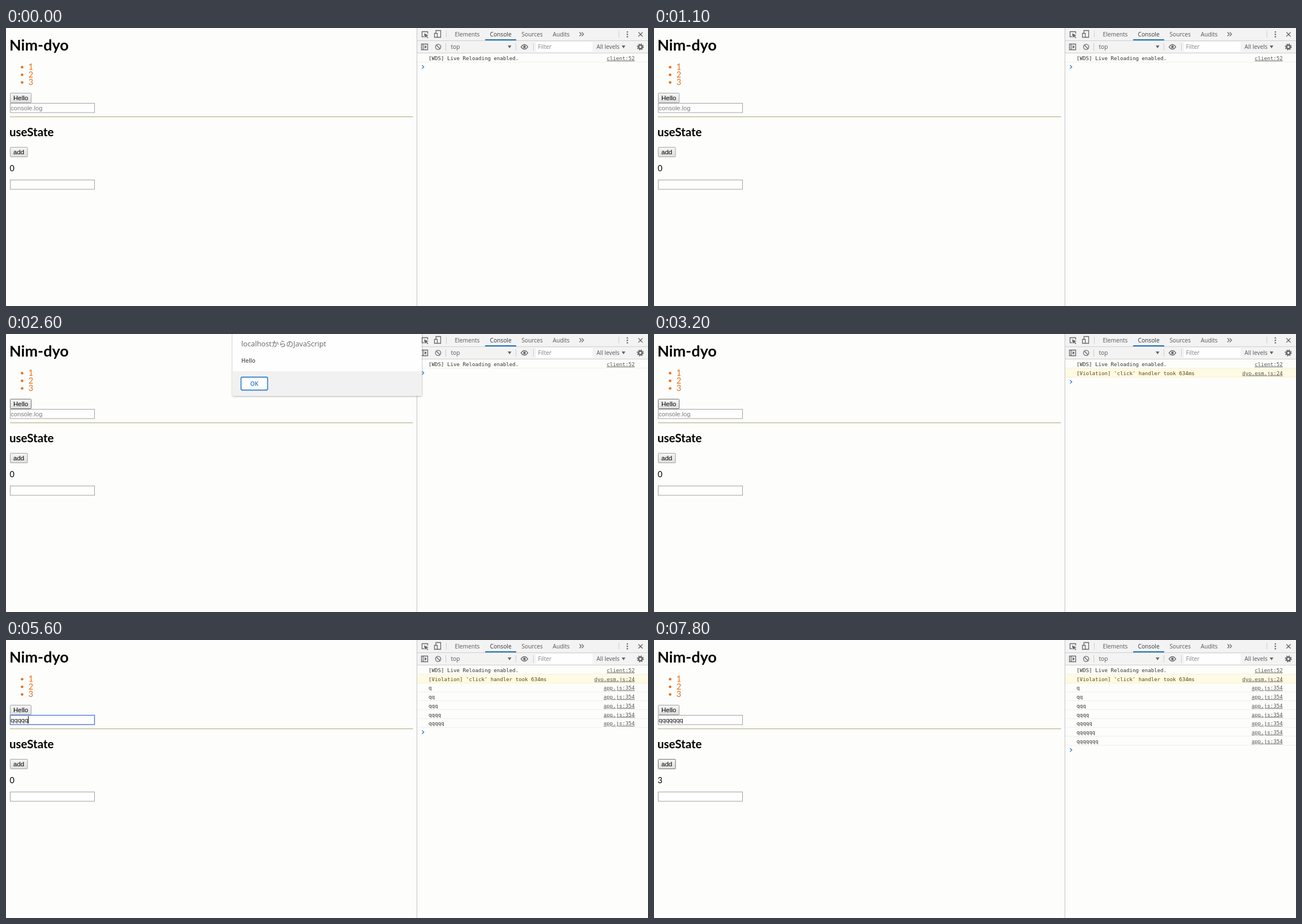
An HTML page for the animation above (8000 ms loop, 1135 by 493 pixels).

```html
<!DOCTYPE html>
<html lang="en">
<head>
<meta charset="utf-8">
<title>Nim-dyo</title>
<style>
  html, body { margin: 0; width: 100%; height: 100%; overflow: hidden; background: #fdfdfb; }
  svg { display: block; width: 1135px; height: 493px; }
  text { white-space: pre; }
  .page { font-family: Lato, sans-serif; }
  .form { font-family: "Liberation Sans", Arial, sans-serif; font-size: 11.1px; }
  .ui { font-family: "Open Sans", "Noto Sans CJK JP", sans-serif; font-size: 10.2px; fill: #555; }
  .log { font-family: "DejaVu Sans Mono", monospace; font-size: 9.13px; fill: #333; }
  .link { text-anchor: end; text-decoration: underline; fill: #555; }
  .warn { fill: #5c4510; }
  .field { fill: #fefefe; stroke: #a0a0a0; }
  .field.focus { stroke: #4d79d6; stroke-width: 1.4; }
  .button rect { fill: url(#face); stroke: #a3a3a3; }
  .button.hover rect { stroke: #707070; }
  .button.down rect { fill: #dcdcdc; }
  .button text { font-size: 11.5px; }
  .icon { fill: none; stroke: #666; stroke-width: 1.3; }
  .solid { fill: #666; }
</style>
</head>
<body>
<svg viewBox="0 0 1135 493">
  <defs>
    <linearGradient id="face" x2="0" y2="1">
      <stop stop-color="#f6f6f6"/><stop offset="1" stop-color="#dedede"/>
    </linearGradient>
    <filter id="shadow" x="-5%" y="-10%" width="110%" height="125%">
      <feDropShadow dx="0" dy="1" stdDeviation="1.8" flood-opacity=".38"/>
    </filter>
  </defs>

  <g class="page">
    <text x="6" y="40" font-size="27" font-weight="700">Nim-dyo</text>
    <g id="list" fill="#e0701c" font-size="14.4"></g>
    <text x="6" y="192" font-size="20.5" font-weight="700">useState</text>
    <text id="count" x="6.5" y="254" font-size="14.4">0</text>
    <path d="M7 157.5H719.5" stroke="#aba56e"/>
  </g>

  <g class="form">
    <g id="hello" class="button">
      <rect x="7.5" y="115.5" width="37" height="17" rx="1"/>
      <text x="13" y="128">Hello</text>
    </g>
    <g id="add" class="button">
      <rect x="7.5" y="211.5" width="30.500" height="17" rx="1"/>
      <text x="13" y="224">add</text>
    </g>
    <rect id="field" class="field" x="7.5" y="133.500" width="149" height="16.500"/>
    <rect class="field" x="7.5" y="269.5" width="149" height="16.500"/>
    <text id="typed" x="8.300" y="145.500"></text>
    <path id="squiggle" fill="none" stroke="#e33" stroke-width=".9"/>
    <rect id="caret" y="135" width="1" height="13"/>
  </g>

  <g id="tools">
    <path d="M727 0H1135V44H727Z" fill="#f3f3f3"/>
    <path d="M727 22.5H1135M727 44.5H1135" stroke="#cfcfcf"/>
    <path d="M726.5 0V493" stroke="#c3c3cb"/>
    <path d="M778.5 5V17M1083.5 5V17M777.5 27V40M901.5 27V40M932.5 27V40" stroke="#ccc"/>
    <path d="M847 20H902V22H847Z" fill="#1b73b9"/>
    <path d="M937 25H1037V42H937Z" fill="#fefefe"/>
    <g class="ui">
      <text x="793.500" y="15">Elements</text>
      <text x="855.500" y="15" fill="#333">Console</text>
      <text x="911.500" y="15">Sources</text>
      <text x="966.500" y="15">Audits</text>
      <text x="786.500" y="37">top</text>
      <text x="940.500" y="37" style="fill:#808080">Filter</text>
      <text x="1044" y="37">All levels</text>
    </g>
    <g class="icon">
      <path d="M739 15.500H735.500V6.500H745.500V10M1014 7.500L1017 11L1014 14.500M1018 7.500L1021 11L1018 14.500M1118 7.500L1125.500 15M1125.500 7.500L1118 15"/>
      <path d="M760 9V4.500H768.500V16.500H763M757.500 9.500H762.500V16.500H757.500Z"/>
      <path d="M734.500 28.500H745.500V38.500H734.500ZM737.500 28.500V38.500"/>
      <circle cx="764" cy="33.500" r="4.700"/>
      <path d="M760.700 30.200L767.300 36.800"/>
      <path d="M910.500 33.500Q916.500 25.500 922.500 33.500Q916.500 41.500 910.500 33.500Z"/>
      <circle cx="1121.500" cy="33.500" r="3.300" stroke-width="2.600"/>
      <circle cx="1121.500" cy="33.500" r="5.200" stroke-width="1.700" stroke-dasharray="2.050 2.034"/>
    </g>
    <g class="solid">
      <path d="M739 9.500L747 13L743.700 14L746.500 17L745.200 18L742.500 15L740.700 17.500Z"/>
      <path d="M740 30.500L744 33.500L740 36.500Z"/>
      <circle cx="916.500" cy="33.500" r="2.300"/>
      <path d="M887 31H893.500L890.250 36ZM1088.500 31H1095L1091.750 36Z"/>
      <circle cx="1098.500" cy="7" r="1.300"/><circle cx="1098.500" cy="11.300" r="1.300"/><circle cx="1098.500" cy="15.600" r="1.300"/>
    </g>
  </g>

  <g id="rows" class="log"></g>
  <path id="prompt" d="M735.500 -3L738.700 0L735.500 3" fill="none" stroke="#367cd6" stroke-width="1.400"/>

  <g id="dialog" class="ui">
    <rect x="400.500" y="-8" width="334.500" height="117.500" rx="2" fill="#fefefe" filter="url(#shadow)"/>
    <path d="M400.500 66H735V109.500H400.500Z" fill="#f1f1f1"/>
    <text x="416" y="22" font-size="12.800" style="font-size:12.8px;fill:#666">localhostからのJavaScript</text>
    <text x="416" y="51" font-weight="600" style="font-size:10px">Hello</text>
    <rect x="415.500" y="76.500" width="47" height="23" rx="2.500" fill="#fefefe" stroke="#3a87cf" stroke-width="1.800"/>
    <text x="439" y="92" font-weight="600" text-anchor="middle" style="fill:#2a7ac6">OK</text>
  </g>
</svg>
<script>
const LOOP = 8000, ROW = 15.75;
const FOCUS = 4000, BLUR = 6900, SPELL = 6200;
const KEYS = [4700, 4900, 5100, 5300, 5500, 5700, 5900];
const CLICKS = [7000, 7300, 7600];
const $ = id => document.getElementById(id);
const between = (t, a, b) => t >= a && t < b;
const passed = (times, t) => times.filter(k => k <= t).length;
const show = (el, on) => { el.style.display = on ? '' : 'none'; };

$('list').innerHTML = [1, 2, 3].map((n, i) => {
  const y = 74 + 13.5 * i;
  return `<circle cx="28.5" cy="${y - 4.5}" r="2.3"/><text x="39.7" y="${y}">${n}</text>`;
}).join('');

const logs = [
  { at: 0, text: '[WDS] Live Reloading enabled.', link: 'client:52' },
  { at: 3200, text: "[Violation] 'click' handler took 634ms", link: 'dyo.esm.js:24', warn: true },
  ...KEYS.map((at, i) => ({ at, text: 'q'.repeat(i + 1), link: 'app.js:354' }))
];
$('rows').innerHTML = logs.map(({ text, link, warn }, i) => {
  const kind = warn ? 'warn' : '';
  return `<g transform="translate(0 ${45 + ROW * i})">
    <rect x="727" width="408" height="${ROW}" fill="${warn ? '#fffae3' : 'none'}"/>
    <path d="M727 ${ROW - 0.25}H1135" stroke="${warn ? '#f8edc8' : '#eeeeec'}"/>
    <text class="${kind}" x="747" y="11.8">${text}</text>
    <text class="link" x="1111.500" y="11.8">${link}</text></g>`;
}).join('');
const rows = [...$('rows').children];

function setButton(el, hover, down) {
  el.setAttribute('class', 'button' + (hover ? ' hover' : '') + (down ? ' down' : ''));
}

function drawField(t) {
  const n = passed(KEYS, t), focused = between(t, FOCUS, BLUR);
  const typed = $('typed'), end = 8.3 + n * 6.17;
  typed.textContent = n ? 'q'.repeat(n) : 'console.log';
  typed.setAttribute('fill', n ? '#111' : '#7d7d7d');
  $('field').setAttribute('class', focused ? 'field focus' : 'field');

  // The caret blinks every half second, starting anew with each key.
  const since = t - (n ? KEYS[n - 1] : FOCUS);
  show($('caret'), focused && since % 1000 < 500);
  $('caret').setAttribute('x', Math.round(end));

  let wave = 'M8.5 147.5';
  for (let x = 10, up = true; x < end; x += 1.5, up = !up) wave += `L${x} ${up ? 146.3 : 147.7}`;
  $('squiggle').setAttribute('d', wave);
  show($('squiggle'), between(t, SPELL, BLUR));
}

function draw() {
  const t = performance.now() % LOOP;
  rows.forEach((row, i) => show(row, t >= logs[i].at));
  const shown = logs.filter(l => l.at <= t).length;
  $('prompt').setAttribute('transform', `translate(0 ${53.25 + ROW * shown})`);
  show($('dialog'), between(t, 2500, 3200));
  setButton($('hello'), between(t, 2200, 3500), between(t, 2400, 2500));
  setButton($('add'), t >= 6600, CLICKS.some(c => between(t, c - 100, c)));
  $('count').textContent = passed(CLICKS, t);
  drawField(t);
  requestAnimationFrame(draw);
}
draw();
</script>
</body>
</html>
```
